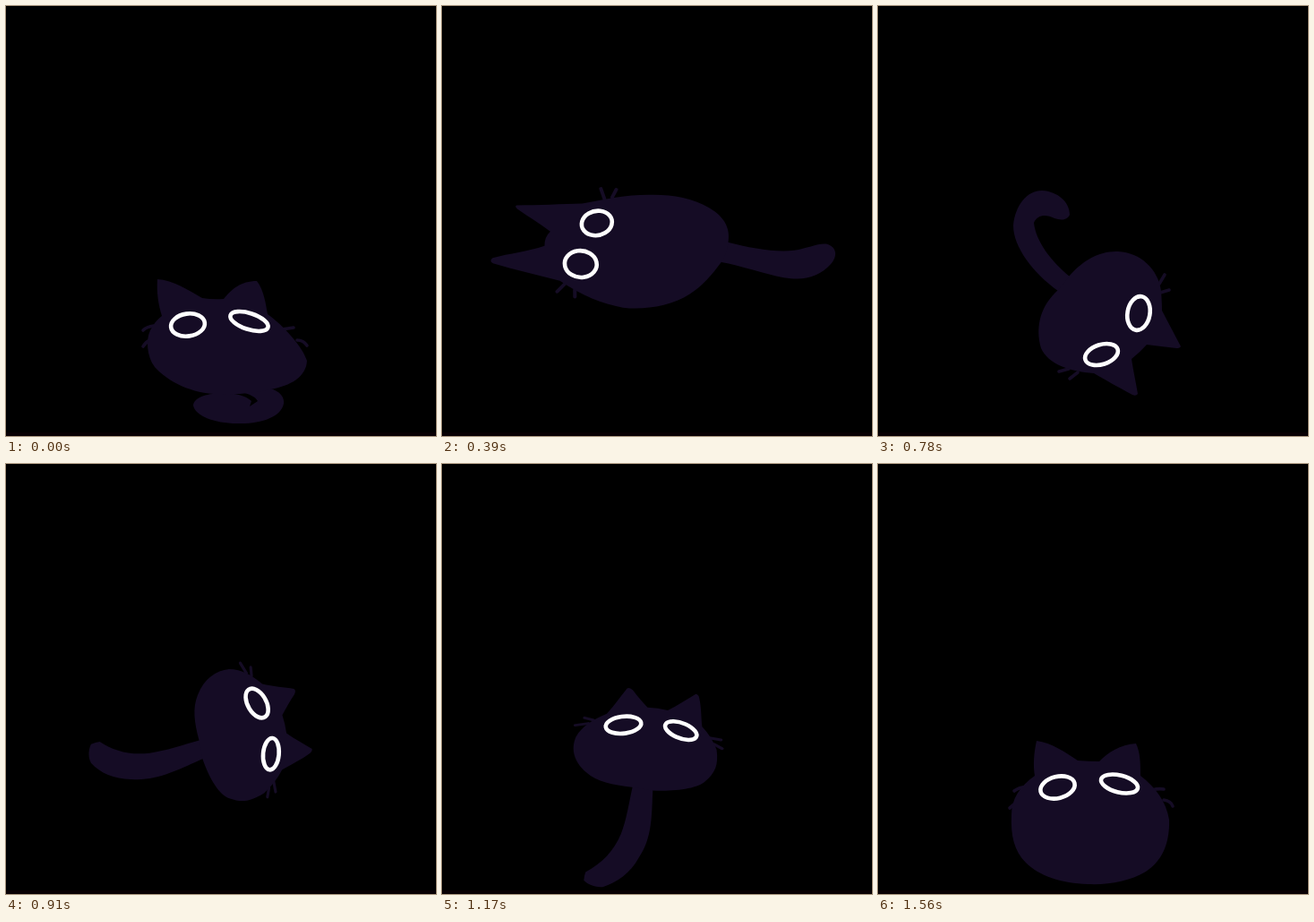
An HTML page that plays this animation: 480x480 px, repeating every 1.82 s.

```html
<!DOCTYPE html>
<html lang="en">
<head>
<meta charset="utf-8">
<title>Cat flip</title>
<style>
  html, body { margin: 0; width: 100%; height: 100%; overflow: hidden; background: #000; }
  svg { display: block; width: 100vw; height: 100vh; }
  .fur { fill: #150c25; }
  .whiskers { fill: none; stroke: #150c25; stroke-width: 3.6; stroke-linecap: round; }
  .eye { fill: #150c25; stroke: #fff; stroke-width: 4.6; vector-effect: non-scaling-stroke; }
</style>
</head>
<body>
<svg id="stage" viewBox="0 0 480 480">
  <rect width="480" height="480" fill="#000"/>
  <rect y="476" width="480" height="4" fill="#080004"/>
  <g id="cat"></g>
</svg>
<script>
const STEP = 130, LOOP = 1820;

// Eyes are [cx, cy, rx, ry, angle].
const crouch = {
  body: 'M169 305C187 306 203 317 219 326Q231 328 243 327C252 316 262 307 280 307C288 317 290 333 292 344C310 357 331 380 336 396C335 414 318 424 295 428C278 432 258 434 240 433C210 434 181 420 166 403C157 391 156 372 161 362Q166 352 174 346C170 333 168 320 169 305Z',
  tail: 'M295 427C306 430 311 437 310 444C307 459 284 467 258 466C232 466 211 457 209 446C210 437 222 433 240 432C256 432 268 435 274 441L272 447L281 441C278 436 272 433 262 431Z',
  whiskers: 'M153 362Q157 358 165 357M153 380Q156 375 161 373M308 361L321 359M325 373Q332 373 336 379',
  eyes: [[203, 356, 19, 12.5, -8], [271.5, 352, 22, 9, 18]]
};

const leap = {
  body: 'M158 184Q160 183 166 187C180 196 193 205 205 214Q214 210 224 211C225 195 227 178 230 168Q233 163 238 169C252 188 262 208 275 225C291 240 312 265 323 284C332 300 333 322 330 336C326 354 308 361 290 366C281 370 272 370 264 369C240 367 221 359 207 345C190 324 174 299 173 272Q171 256 173 243C166 224 160 202 158 184Z',
  tail: 'M289 365C298 384 313 410 320 433C323 447 318 462 302 466C288 467 281 457 283 448C288 440 288 431 286 419C282 400 273 383 264 368Z',
  whiskers: 'M160 258L173 261M164 270L174 268M286 234L297 229M295 243L306 246',
  eyes: [[206, 255, 18.5, 13.5, 30], [260.5, 245, 20, 15, 28]]
};

const dive = {
  body: 'M103 355C121 342 139 328 155 316C171 298 185 282 204 269C220 257 240 248 260 248C281 248 292 257 299 270Q306 282 307 293C308 312 308 326 303 342C296 365 276 384 258 393C238 401 218 405 189 403C167 410 145 418 123 424Q118 424 119 419C130 405 143 393 153 378Q147 370 148 361C133 359 118 359 106 358Q102 357 103 355Z',
  tail: 'M298 271C322 263 344 254 358 241C368 231 373 219 381 216C391 214 397 222 397 233C396 254 386 265 368 273C349 281 327 285 306 294Z',
  whiskers: 'M160 291L170 299M173 283L175 293M195 403L194 415M207 403L212 410',
  eyes: [[180, 326.5, 14, 15.5, 20], [194.5, 375, 16, 15.5, 0]]
};

const tuck = {
  body: 'M213 302C228 284 248 273 268 274C293 275 313 294 316 318Q317 332 317 340C324 353 331 367 338 380Q337 382 333 382C322 381 310 379 300 378Q293 386 283 394C285 407 288 421 290 433Q288 436 284 434C269 426 253 417 241 410C214 408 190 400 182 382C175 357 182 334 201 317Z',
  tail: 'M201 318C173 298 151 269 151 245C153 223 166 206 183 206C201 207 214 219 214 233C211 240 203 239 197 237C187 232 178 233 174 242C176 262 193 285 214 302Z',
  whiskers: 'M314 310L320 300M315 320L325 317M202 408L213 405M214 416L223 409',
  eyes: [[291, 343, 12.5, 19, 10], [249.5, 389, 19, 11, -18]]
};

const rise = {
  body: 'M209 219C218 209 227 196 234 187Q237 185 240 190C244 199 249 208 253 215Q264 217 274 221C286 215 296 208 306 202Q309 203 309 208C310 222 308 236 308 247Q317 262 320 280C320 301 315 311 304 321C294 331 270 332 246 328C238 325 232 323 225 321C205 316 189 310 179 296C167 280 166 262 173 247C181 233 194 225 209 219Z',
  tail: 'M247 326C242 360 240 392 222 418C212 436 196 449 180 453C171 453 164 447 161 442Q162 436 164 431C182 421 197 406 207 383C215 364 220 341 226 320Z',
  whiskers: 'M174 231L188 230M185 222L194 226M314 263L326 267M318 272L326 279',
  eyes: [[225, 236, 19, 11.5, -4], [285, 250, 18.5, 10, 36]]
};

const sit = {
  body: 'M177 309C194 311 209 322 223 331Q235 332 247 332C257 322 270 313 288 312C293 322 293 336 293 348C309 360 322 377 325 397C326 425 316 444 299 455C280 466 258 470 234 469C205 468 180 460 165 445C152 432 148 415 149 392C149 374 158 360 175 348C173 336 174 322 177 309Z',
  tail: '',
  whiskers: 'M152 365Q157 361 167 360M147 384L153 379M306 364Q313 362 319 363M319 375Q327 376 329 382',
  eyes: [[200.5, 361, 19.5, 12, -14], [269.5, 357, 21, 9.5, 14]]
};

// Place a pose: its pivot (px, py) lands on (x, y), turned and then scaled.
const place = (x, y, sx, sy, turn, px, py) =>
  `translate(${x} ${y}) scale(${sx} ${sy}) rotate(${turn}) translate(${-px} ${-py})`;

const steps = [
  [crouch],
  [leap, place(296, 466, 1.03, 0.82, 8, 300, 466)],
  [leap],
  [dive, place(245, 275, 1.13, 0.95, 35, 252, 318)],
  [dive],
  [tuck, place(235, 335, 1, 1.08, 50, 245, 330)],
  [tuck],
  [rise, place(263, 300, 0.88, 0.96, 60, 245, 270)],
  [rise],
  [rise, place(242, 467, 1.05, 0.82, -6, 240, 453)],
  [sit],
  [sit, place(233, 469, 1.19, 0.84, 0, 238, 469)],
  [sit]
];

const cat = document.getElementById('cat');
const eye = ([cx, cy, rx, ry, turn]) =>
  `<ellipse class="eye" cx="${cx}" cy="${cy}" rx="${rx}" ry="${ry}" transform="rotate(${turn} ${cx} ${cy})"/>`;

const draw = ({ body, tail, whiskers, eyes }) =>
  `<path class="fur" d="${tail}"/><path class="whiskers" d="${whiskers}"/>` +
  `<path class="fur" d="${body}"/>` + eyes.map(eye).join('');

let shown = -1;
function tick() {
  const time = performance.now() % LOOP;
  const i = Math.min(Math.floor(time / STEP), steps.length - 1);
  if (i !== shown) {
    const [pose, transform = ''] = steps[i];
    cat.setAttribute('transform', transform);
    cat.innerHTML = draw(pose);
    shown = i;
  }
  requestAnimationFrame(tick);
}
tick();
</script>
</body>
</html>
```
